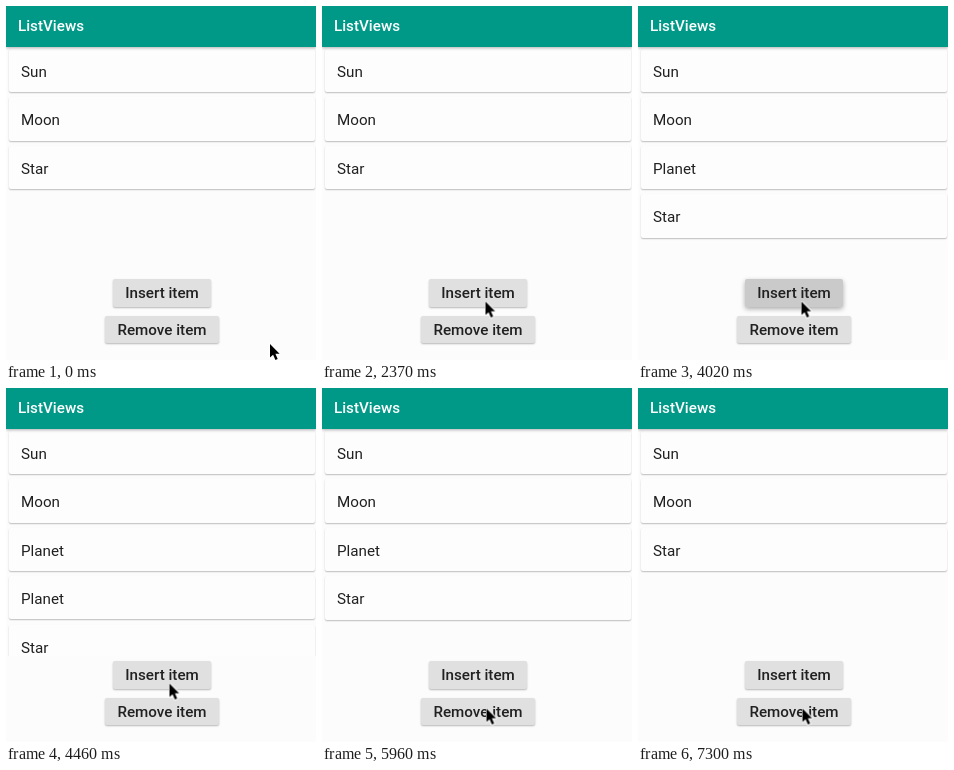
Write an HTML page that moves like this. It is 310 by 354 pixels and loops after 8 s.

```html
<!DOCTYPE html>
<html lang="en">
<head>
<meta charset="utf-8">
<title>ListViews</title>
<style>
  html, body { margin: 0; width: 100%; height: 100%; overflow: hidden; background: #fcfcfc; }
  body { position: relative; font: 15.2px Roboto, sans-serif; color: #212121; }
  body * { position: absolute; box-sizing: border-box; }

  .bar {
    left: 0; top: 0; width: 310px; height: 40.5px; padding-left: 12px;
    background: #009987; color: #fff; font-weight: 500; line-height: 40px;
    box-shadow: 0 1px 3px rgba(0, 0, 0, .3);
  }
  .list { left: 0; top: 41px; width: 310px; height: 227px; overflow: hidden; }
  .card {
    left: 3px; top: calc(1.5px + var(--slot) * 48.6px);
    width: 306px; height: 43.5px; padding-left: 12px; line-height: 46.4px;
    background: #fdfdfd; border-radius: 2px;
    box-shadow: 0 1px 1.5px rgba(0, 0, 0, .25);
  }
  .btn {
    height: 27.5px; line-height: 28px; text-align: center; white-space: nowrap;
    font-weight: 500; background: #e0e0e0; border-radius: 2px;
    box-shadow: 0 1px 2px rgba(0, 0, 0, .28);
  }
  .insert { left: 107px; top: 273px; width: 98px; }
  .remove { left: 99px; top: 309.5px; width: 114px; }
  .cursor { left: 0; top: 0; width: 12px; height: 18px; overflow: visible; }

  .old, .new, .star, .insert, .remove, .cursor { animation: 8s step-end infinite; }
  .old { animation-name: old; }
  .new { animation-name: new; }
  .star { animation-name: star; }
  .insert { animation-name: insert; }
  .remove { animation-name: remove; }
  .cursor { animation-name: cursor; }

  /* Inserting opens a gap, then fades in; removing fades out, then closes it. */
  @keyframes old {
    0% { --slot: 2; opacity: 0; }
    37.125% { --slot: 2; opacity: .5; }
    39% { --slot: 2; opacity: 1; }
    52.125% { --slot: 2.5; opacity: 1; }
    53.875% { --slot: 3; opacity: 1; }
    72.625% { --slot: 2.4; opacity: 1; }
    74.5% { --slot: 2; opacity: 1; }
    87.625% { --slot: 2; opacity: .3; }
    89.5%, 100% { --slot: 2; opacity: 0; }
  }
  @keyframes new {
    0% { opacity: 0; }
    53.875% { opacity: .5; }
    55.75% { opacity: 1; }
    70.75% { opacity: .3; }
    72.625%, 100% { opacity: 0; }
  }
  @keyframes star {
    0% { --slot: 2; }
    35.25% { --slot: 2.5; }
    37.125% { --slot: 3; }
    52.125% { --slot: 3.5; }
    53.875% { --slot: 4; }
    72.625% { --slot: 3.4; }
    74.5% { --slot: 3; }
    89.5% { --slot: 2.4; }
    91.25%, 100% { --slot: 2; }
  }
  @keyframes insert {
    0%, 39%, 55.75%, 100% { background: #e0e0e0; box-shadow: 0 1px 2px rgba(0, 0, 0, .28); }
    33.375%, 50.25% { background: #cacaca; box-shadow: 0 2px 5px rgba(0, 0, 0, .32); }
  }
  @keyframes remove {
    0%, 74.5%, 91.25%, 100% { background: #e0e0e0; box-shadow: 0 1px 2px rgba(0, 0, 0, .28); }
    68.875%, 85.75% { background: #cacaca; box-shadow: 0 2px 5px rgba(0, 0, 0, .32); }
  }
  @keyframes cursor {
    0% { transform: translate(264px, 338px); }
    1.875% { transform: translate(260px, 326px); }
    11.25% { transform: translate(259px, 326px); }
    13.125% { transform: translate(252px, 324px); }
    14.875% { transform: translate(236px, 318px); }
    16.75% { transform: translate(214px, 311px); }
    18.625% { transform: translate(193px, 304px); }
    20.5% { transform: translate(178px, 299px); }
    22.25% { transform: translate(169px, 297px); }
    24.125% { transform: translate(165px, 296px); }
    29.625% { transform: translate(163.5px, 295.5px); }
    63.25% { transform: translate(163.5px, 299px); }
    65.125% { transform: translate(164px, 308px); }
    67% { transform: translate(164.5px, 316px); }
    68.875%, 100% { transform: translate(164.5px, 320.5px); }
  }
</style>
</head>
<body>
  <div class="list">
    <div class="card" style="--slot: 0">Sun</div>
    <div class="card" style="--slot: 1">Moon</div>
    <div class="card star">Star</div>
    <div class="card old">Planet</div>
    <div class="card new" style="--slot: 2">Planet</div>
  </div>
  <div class="bar">ListViews</div>
  <div class="btn insert">Insert item</div>
  <div class="btn remove">Remove item</div>
  <svg class="cursor" viewBox="0 0 12 18">
    <path d="M0 0V13.5L3.1 10.7 5.4 16 7.7 15 5.4 9.8H9.6Z"
      stroke="#fff" stroke-width="2" stroke-linejoin="round" paint-order="stroke"/>
  </svg>
</body>
</html>
```
